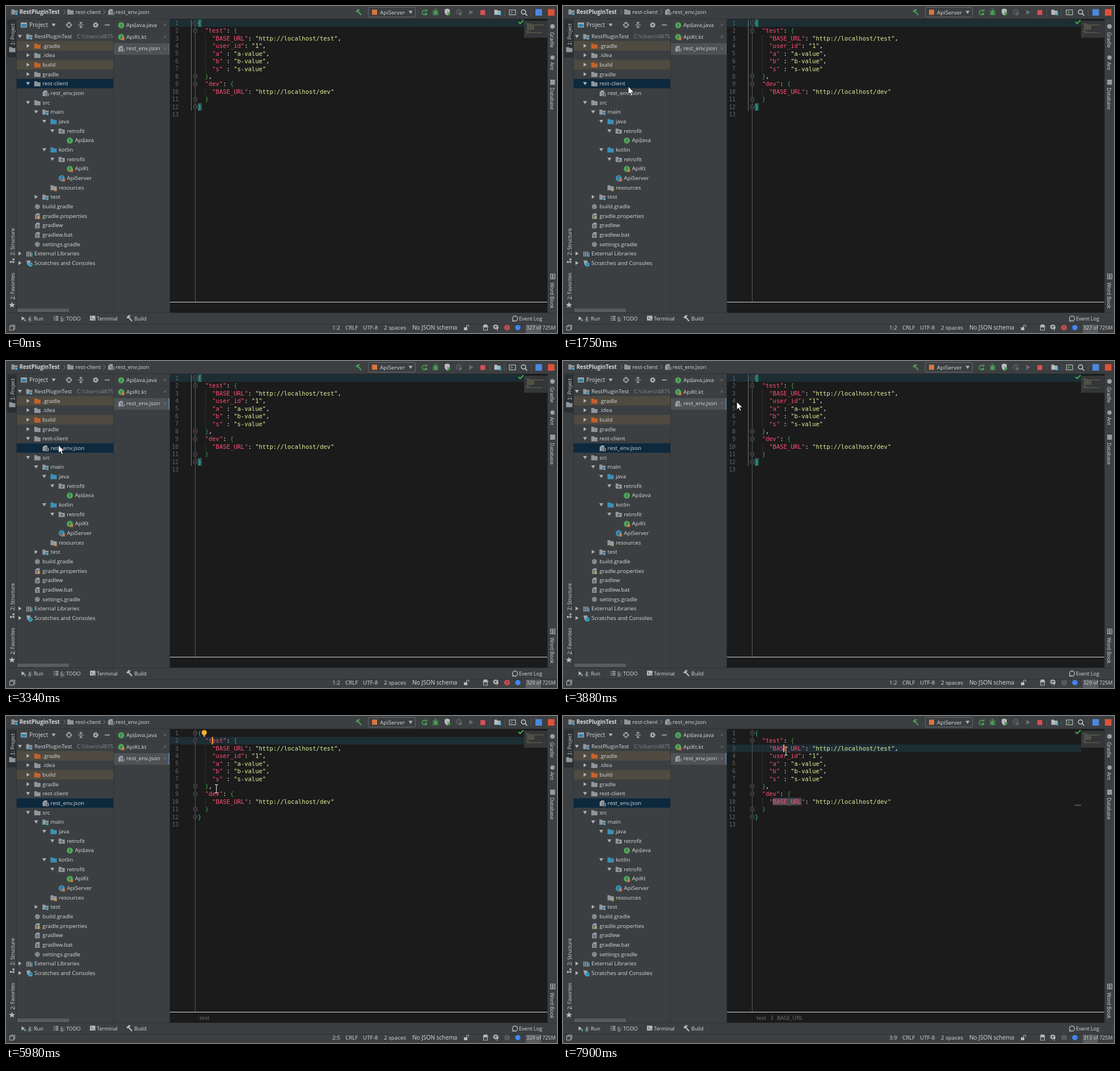
Animation, 971 px wide and 577 px high, one loop 8000 ms. Source, as an HTML page:

```html
<!DOCTYPE html>
<html lang="en">
<head>
<meta charset="utf-8">
<title>IDE session</title>
<style>
html, body { margin: 0; width: 100%; height: 100%; overflow: hidden; background: #3c3f41; }
svg { display: block; width: 100vw; height: 100vh; }
text { font: 9.8px "Open Sans", "Noto Sans", sans-serif; fill: #d6d9db; white-space: pre; }
.code { font: 10.5px "DejaVu Sans Mono", monospace; }
.num { font: 9.6px "DejaVu Sans Mono", monospace; fill: #64676a; }
</style>
</head>
<body>
<svg id="stage" viewBox="0 0 971 577" preserveAspectRatio="none"></svg>
<script>
const LOOP = 8000, CHAR = 6.322, LINE = 13.45, ROW = 16.667, CODE_X = 338;
const GREY = '#b8babc', DIM = '#6a6d70', GREEN = '#499c54', BLUE = '#3d8fb8', ORANGE = '#d9773f';
const lineY = n => 30 + (n - 1) * LINE;
const rowY = n => 53.5 + n * ROW;

// Markup helpers; text is placed by its vertical middle.
const esc = s => s.replace(/&/g, '&amp;').replace(/</g, '&lt;');
const rect = (x, y, w, h, fill, more = '') => `<rect x="${x}" y="${y}" width="${w}" height="${h}" fill="${fill}" ${more}/>`;
const dot = (x, y, r, fill, more = '') => `<circle cx="${x}" cy="${y}" r="${r}" fill="${fill}" ${more}/>`;
const ring = (x, y, r, color = GREY, w = 1.3) => dot(x, y, r, 'none', `stroke="${color}" stroke-width="${w}"`);
const path = (d, fill) => `<path d="${d}" fill="${fill}"/>`;
const line = (d, color = GREY, w = 1.2, more = '') => `<path d="${d}" fill="none" stroke="${color}" stroke-width="${w}" ${more}/>`;
const text = (x, y, s, more = '') => `<text x="${x}" y="${y + 3.5}" ${more}>${esc(s)}</text>`;
const small = (x, y, s) => text(x, y, s, 'style="font-size:9.1px"');
const turned = (x, y, a, s) => `<g transform="translate(${x} ${y}) rotate(${a})">${text(0, 0, s, 'style="font-size:8.9px"')}</g>`;
const group = (id, body) => `<g id="${id}">${body}</g>`;

// Icons, each centred on x, y.
const folder = (x, y, c = '#8f979c') => path(`M${x - 5.5} ${y - 4.5}h4.5l1.5 1.8h5v7.2h-11z`, c);
const badge = (x, y) => rect(x + 1, y + 1, 4.5, 4.5, '#40b6e0', 'stroke="#3c3f41" stroke-width=".8"');
const module = (x, y) => folder(x, y) + badge(x, y);
const pack = (x, y) => folder(x, y) + dot(x, y + 1, 1.4, '#3c3f41');
const resources = (x, y) => folder(x, y) + line(`M${x + 1} ${y + 1.5}h5m-5 2h5m-5 2h5`, '#e0a84a', 1);
const sheet = (x, y) => path(`M${x - 1} ${y - 5}h5v10h-8v-7z`, '#9aa2a8');
const page = (x, y) => sheet(x, y) + line(`M${x - 2.5} ${y - 1}h5m-5 2h5m-5 2h5`, '#3c3f41', .9);
const json = (x, y) => {
  const braces = `M${x + 1.5} ${y - .5}q-1.5 0-1.5 1.5 0 1.3-1 1.3 1 0 1 1.3 0 1.5 1.5 1.5m2-5.6q1.5 0 1.5 1.5 0 1.3 1 1.3-1 0-1 1.3 0 1.5-1.5 1.5`;
  return sheet(x - 1, y) + line(braces, '#3c3f41', 2.6) + line(braces, '#c3c9cd', 1);
};
const props = (x, y) => page(x, y) + line(`M${x - 1} ${y + 5}v-3`, '#e05555', 1.6) + line(`M${x + 1.5} ${y + 5}v-5`, '#e0b040', 1.6) + line(`M${x + 4} ${y + 5}v-4`, '#62b543', 1.6);
const letter = (x, y, c, s) => dot(x, y, 5.4, c) + text(x, y - .6, s, 'text-anchor="middle" style="font-size:8px;fill:#243;font-weight:600"');
const face = (x, y) => letter(x, y, '#4fa65a', 'I');
const ktFace = (x, y) => face(x, y) + rect(x + 1, y + 1, 4.6, 4.6, ORANGE);
const ktClass = (x, y) => letter(x, y, '#3f93bd', 'C') + rect(x + 1, y + 1, 4.6, 4.6, ORANGE);
const build = (x, y) => dot(x, y, 4.5, '#7f8b91');
const libs = (x, y) => line(`M${x - 4} ${y - 4}v9m3-9v9m3-9v9`, '#9aa7b0', 1.7) + line(`M${x + 4.5} ${y - 2}v7`, '#40b6e0', 1.7);
const scratch = (x, y) => path(`M${x - 5} ${y - 5}h7v8h-5z`, '#9aa2a8') + dot(x + 2, y + 2, 3.8, '#40a6d0') + line(`M${x + 2} ${y}v2h2`, '#263238', 1);
const arrow = (x, y, open) => path(open ? `M${x - 3.5} ${y - 2.5}h7l-3.5 5.5z` : `M${x - 2.5} ${y - 3.5}v7l5.5-3.5z`, '#b0b3b5');
const gear = (x, y) => ring(x, y, 2.6, GREY, 1.8) + dot(x, y, 4.2, 'none', `stroke="${GREY}" stroke-width="1.6" stroke-dasharray="1.7 1.6"`);
const chevron = (x, y, c = '#7b7e80') => line(`M${x - 1.5} ${y - 4}l3 4-3 4`, c, 1);
const hammer = (x, y, c) => line(`M${x - 2} ${y - 2}l6 7`, c, 2.2) + path(`M${x - 6} ${y - 1}l4-4.5 4 .5-5 5.5z`, c);
const cross = (x, y) => line(`M${x - 2} ${y - 2}l4 4m0-4l-4 4`, '#7b7e80', .9);

// Tree rows: depth, state (1 open, 0 closed, -1 leaf), icon, label.
const excluded = (x, y) => folder(x, y, '#c4622d');
const sources = (x, y) => folder(x, y, BLUE);
const tree = [
  [0, 1, module, 'RestPluginTest'], [1, 0, excluded, '.gradle'], [1, 0, folder, '.idea'],
  [1, 0, excluded, 'build'], [1, 0, folder, 'gradle'], [1, 1, folder, 'rest-client'],
  [2, -1, json, 'rest_env.json'], [1, 1, folder, 'src'], [2, 1, module, 'main'],
  [3, 1, sources, 'java'], [4, 1, pack, 'retrofit'], [5, -1, face, 'ApiJava'],
  [3, 1, sources, 'kotlin'], [4, 1, pack, 'retrofit'], [5, -1, ktFace, 'ApiKt'],
  [4, -1, ktClass, 'ApiServer'], [3, -1, resources, 'resources'], [2, 0, module, 'test'],
  [1, -1, build, 'build.gradle'], [1, -1, props, 'gradle.properties'], [1, -1, page, 'gradlew'],
  [1, -1, page, 'gradlew.bat'], [1, -1, build, 'settings.gradle'],
  [0, 0, libs, 'External Libraries'], [0, 0, scratch, 'Scratches and Consoles']
];
const source = [
  '{', '  "test": {', '    "BASE_URL": "http://localhost/test",', '    "user_id": "1",',
  '    "a" : "a-value",', '    "b" : "b-value",', '    "s" : "s-value"', '  },',
  '  "dev": {', '    "BASE_URL": "http://localhost/dev"', '  }', '}', ''
];

function treePanel() {
  let s = rect(19, 23, 171, 518, '#3c3f41') + [1, 3].map(n => rect(19, rowY(n) - 8.3, 170, ROW, '#4f4b41')).join('');
  s += rect(19, 0, 170, ROW, '#0d293e', 'id="sel"');
  tree.forEach(([d, state, icon, label], n) => {
    const x = 41 + d * 14.3, y = rowY(n);
    if (state >= 0) s += arrow(x - 16.5, y, state);
    s += icon(x, y + .5) + text(x + 9, y, label);
  });
  s += text(125, rowY(0), 'C:\\Users\\4875', 'style="fill:#85898c"');
  s += rect(26, 29, 11, 9, '#9aa7b0') + rect(27.3, 32, 8.4, 4.8, '#2f83a8');
  s += text(41, 33.5, 'Project', 'style="font-size:10.2px"') + arrow(84, 33.5, 1);
  s += ring(111, 33.5, 4) + line('M111 28v4m0 3v4M105.5 33.5h4m3 0h4');
  s += line('M127 33.5h10M132 27.5v3.5m0 5v3.5M129.5 29l2.5 2.3 2.5-2.3M129.5 38l2.5-2.3 2.5 2.3', GREY, 1.1);
  return s + gear(158, 33.5) + line('M174 33.5h9', GREY, 1.4) + rect(20, 534, 91, 6, '#595b5d');
}

function tabs() {
  const items = [[face, 'ApiJava.java'], [ktFace, 'ApiKt.kt'], [json, 'rest_env.json']];
  return rect(190, 23, 99, 518, '#3c3f41') + rect(190, 65, 99, 21, '#4e5254') + rect(286.5, 65, 2.5, 21, '#747a80', 'id="mark"') +
    items.map(([icon, s], i) => icon(203, 34 + i * 20.7) + text(212, 33.5 + i * 20.7, s) + cross(280, 33.5 + i * 20.7)).join('') +
    line('M190 44.5h98M190 64.8h98', '#35383a', .8);
}

function codeLine(s, n) {
  const indent = s.search(/\S/);
  if (indent < 0) return '';
  const brace = indent ? '#3fa04a' : '#22c3a6';
  const body = s.trim().replace(/"[^"]*"(?=\s*:)|"[^"]*"|[{}]/g, m => {
    const key = m[0] === '"' && /^\s*:/.test(s.slice(s.indexOf(m) + m.length));
    const c = m[0] !== '"' ? brace : key ? '#ff4d76' : '#dcf49a';
    return `<tspan fill="${c}">${m}</tspan>`;
  });
  return `<text class="code" style="fill:#f2f2f2" x="${CODE_X + indent * CHAR}" y="${lineY(n + 1) + 3.8}">${body}</text>`;
}

function editor() {
  let s = rect(289, 23, 666, 518, '#1b1b1b') + rect(289, 0, 624, LINE, '#1d2d34', 'id="current"');
  s += line('M333.5 24V522', '#55585a', 1) + line('M351.5 51V118M351.5 145v13', '#3a3a3a', 1, 'stroke-dasharray="2 1"');
  s += group('braces', rect(338, 23.5, 6.8, 13.3, '#2d5f59') + rect(338, 171.5, 6.8, 13.3, '#2d5f59') + line('M326.5 24V185', '#6f7577', 1));
  s += rect(CODE_X + 5 * CHAR, lineY(10) - 6.5, 8 * CHAR, 13, '#484a50', 'id="usage"');
  source.forEach((l, i) => {
    s += `<text class="num" text-anchor="end" x="304" y="${lineY(i + 1) + 3.6}">${i + 1}</text>` + codeLine(l, i);
  });
  for (const n of [1, 2, 8, 9, 11, 12]) {
    const y = lineY(n);
    s += rect(330.5, y - 3.2, 6, 6.4, '#1b1b1b', 'stroke="#606366" stroke-width=".9" rx="1"') + line(`M331.8 ${y}h3.4`, '#777', .9);
  }
  // Minimap and inspection mark.
  s += rect(913, 26, 41, 30, '#343637');
  source.forEach((l, i) => {
    const d = Math.max(0, l.search(/\S/));
    if (l) s += line(`M${915 + d * .8} ${29.5 + i * 1.95}H${915 + l.length * .8}`, '#a5a477', 1, 'opacity=".55" stroke-dasharray="4 .6"');
  });
  s += line('M903 28l3 3 6-6', '#3fae49', 2) + line('M902 157.5h11', '#587573', 1.4, 'id="stripe"');
  s += line('M289 522.5H954', '#d8d8d8', 1.1);
  s += text(341, 532, '', 'id="crumb" style="fill:#747678"');
  s += group('crumb2', chevron(368.5, 532.5, '#858789') + text(377, 532, 'BASE_URL', 'style="fill:#747678"'));
  s += group('bulb', dot(349.3, 29.3, 4.6, '#f2ad2e') + rect(347, 33, 4.6, 1.6, '#d69a31') + rect(347.5, 35, 3.6, 1.3, '#aaa'));
  return s + rect(0, 0, 2, 13.2, '#ffae2b', 'id="caret"');
}

function topBar() {
  const y = 10.5;
  let s = rect(0, 0, 971, 23, '#3c3f41') + module(15, y) + text(23.7, y, 'RestPluginTest', 'style="font-weight:700;font-size:9.7px"');
  s += chevron(103, y) + folder(113.5, y) + text(122, y, 'rest-client');
  s += group('file', chevron(173, y) + json(185, y) + text(193, y, 'rest_env.json'));
  s += hammer(622, 11, GREEN) + rect(638.5, 2.5, 83, 17, '#3c3f41', 'stroke="#66696b" rx="2"');
  s += rect(645, 6.5, 9, 9, ORANGE) + text(659, 11, 'ApiServer') + arrow(713, 11, 1);
  s += line('M740 8.5a4 4 0 1 0 1 5', GREEN, 1.6) + path('M738 9.5h4.5V5z', GREEN) + rect(738, 12, 4, 4, GREEN);
  s += `<ellipse cx="757" cy="12" rx="3.3" ry="4.3" fill="${GREEN}"/>` + line('M752 8l10 8m0-8l-10 8M751.5 12h11M755 5l2 2 2-2', GREEN, 1.1);
  s += path('M773 6l4.5-1.5L782 6v5q-.5 3.5-4.5 5.5-4-2-4.5-5.5z', GREY) + path('M778 10v7.5l6-3.7z', GREEN);
  s += ring(798, 10.5, 4.4, DIM) + line('M798 8v3h2', DIM) + path('M799 11v6l5-3z', DIM) + path('M816.5 6.5v9l7-4.5z', DIM);
  s += rect(836, 7.3, 8.5, 8.5, '#db4f55') + line('M852.5 5v13M878.5 5v13M925.5 5v13', '#505355', 1);
  s += folder(866, 11, GREY) + rect(867, 11, 2.5, 2.5, '#40b6e0') + rect(870, 14, 2.5, 2.5, '#40b6e0') + rect(870, 11, 2.5, 2.5, '#40b6e0');
  s += rect(887, 7, 11, 8.5, 'none', `stroke="${GREY}" stroke-width="1.2"`) + path('M890 9v5l4-2.5z', GREEN);
  s += ring(912, 10.5, 3.8, '#c3c6c8', 1.5) + line('M914.8 13.3l3.7 3.7', '#c3c6c8', 1.7);
  return s + rect(933, 5.5, 11.5, 11.5, '#4d87e0') + rect(955, 5.5, 11.5, 11.5, '#df5139');
}

function sideBars() {
  let s = rect(0, 23, 19, 538, '#3c3f41') + rect(2, 24, 16, 67, '#2c2f31') + turned(11, 69, -90, '1: Project') + folder(11, 77);
  s += turned(11, 440, -90, '7: Structure') + line('M14.8 440v-5M14.8 518v-5M14.8 69v-4', GREY, .8);
  s += rect(7, 450, 3.2, 3.2, GREY) + rect(11.5, 450, 3.2, 3.2, GREY) + rect(11.5, 445.5, 3.2, 3.2, GREY);
  s += turned(11, 518, -90, '2: Favorites') + path('M10.5 522l1.5 3.7 4 .2-3.1 2.5 1.1 3.9-3.5-2.2-3.5 2.2 1.1-3.9-3.1-2.5 4-.2z', GREY);
  s += rect(954, 23, 17, 538, '#3c3f41') + dot(963, 36, 4, '#9aa2a6') + turned(962, 46, 90, 'Gradle');
  s += dot(963, 91, 3.8, '#9aa2a6') + turned(962, 99, 90, 'Ant');
  s += [131, 134, 137].map(y => rect(959, y - .7, 8.5, 2.2, GREY)).join('') + turned(962, 144, 90, 'Database');
  s += rect(959.5, 473, 8, 8.5, 'none', `stroke="${GREY}"`) + line('M961 475.5h5m-5 2h5m-5 2h5M963 473v8', GREY, .8) + turned(962, 488, 90, 'Word Book');
  return s;
}

function bottomBars() {
  let s = rect(0, 541, 971, 36, '#3c3f41');
  s += path('M27.5 547.5v7.5l6-3.8z', GREY) + dot(33.5, 554.5, 1.8, '#50b85a') + small(39, 551, '4: Run') + line('M39 556h5M96 556h5', GREY, .8);
  s += line('M84 548h1.5m1.5 0h5.5M84 551h1.5m1.5 0h5.5M84 554h1.5m1.5 0h5.5', GREY, 1.3) + small(96, 551, '6: TODO');
  s += rect(148, 546.5, 9.5, 8.5, GREY) + line('M150 549l2 1.8-2 1.8m3.5.4h2.5', '#34373a', 1) + small(160, 551, 'Terminal');
  s += hammer(218, 551, GREY) + small(226, 551, 'Build');
  s += ring(897, 551.5, 4.5) + path('M892 557l1-4 3 3z', GREY) + small(904, 551, 'Event Log');
  s += rect(6.5, 565, 7, 7, 'none', `stroke="${GREY}"`) + line('M8.5 565v-2h7v7h-2', GREY, 1);
  s += text(575, 567, '', 'id="pos"') + text(598, 567, 'CRLF') + text(629, 567, 'UTF-8') + text(666, 567, '2 spaces');
  s += text(716, 567, 'No JSON schema', 'style="font-size:10.1px"');
  s += rect(807, 567, 6, 5, GREY) + line('M811.5 567v-2a2 2 0 0 1 4 0v1.5', GREY, 1.1);
  s += path('M842 562h6l.8 3H850v1.2h-10V565h1.2z', GREY) + rect(841.5, 567, 7, 5, 'none', `stroke="${GREY}"`);
  s += gear(863, 566) + text(864, 569, '?', 'style="font-weight:700;font-size:8px"');
  s += dot(883, 567.5, 5, '#d04b4b', 'id="alert"') + line('M883 564.5v3.6m0 1.1v1.4', '#3c3f41', 1.4);
  s += dot(902, 567.5, 4.7, '#4285f4') + rect(916, 561, 27, 16, '#595c5e');
  return s + text(917, 567.5, '', 'id="mem" style="font-size:8.9px"');
}

const stage = document.getElementById('stage');
const frame = line('M0 22.5H971M18.5 23V541M189.5 23V541M288.5 23V541M954.5 23V541M0 541.5H971M0 561.5H971', '#303234', 1);
const pointer = group('arrow', `<path d="M0 0V14L3.2 11 5.6 16.2 7.8 15.2 5.5 10.2H10Z" fill="#fff" stroke="#111" stroke-width=".8"/>`) +
  group('beam', line('M-3.3-7.2h2.3l1 1 1-1h2.3M-3.3 7.2h2.3l1-1 1 1h2.3M0-6.5v13', '#111', 2.4) +
    line('M-3-7.2h2l1 1 1-1h2M-3 7.2h2l1-1 1 1h2M0-6.5v13', '#eee', 1.1));
stage.innerHTML = treePanel() + tabs() + editor() + topBar() + sideBars() + bottomBars() + frame + pointer;

const el = Object.fromEntries([...stage.querySelectorAll('[id]')].map(e => [e.id, e]));
const set = (e, attrs) => { for (const k in attrs) e.setAttribute(k, attrs[k]); };
const show = (e, on) => e.setAttribute('visibility', on ? 'visible' : 'hidden');

// Pointer stops: time, x, y.
const stops = [
  [160, 959, 46], [640, 959, 46], [1420, 208, 122], [1750, 115, 142], [2050, 108, 138], [2260, 108, 138],
  [2590, 82, 152], [3280, 82, 152], [3610, 200, 112], [3790, 200, 112], [3880, 306, 72], [4400, 364, 46],
  [4570, 364, 46], [4660, 364, 44], [5050, 364, 44], [5740, 371, 128], [5920, 371, 128], [6400, 367, 138],
  [6790, 367, 138], [7200, 394, 66], [7720, 394, 66], [7900, 393, 62], [8000, 393, 62]
];
const slope = (i, k) => stops[i + 1] ? (stops[i + 1][k] - stops[i][k]) / (stops[i + 1][0] - stops[i][0]) : 0;
function tangent(i, k) {
  const a = i ? slope(i - 1, k) : 0, b = slope(i, k);
  return a * b > 0 ? 2 * a * b / (a + b) : 0;
}
function pointerAt(t) {
  let i = 0;
  while (i < stops.length - 2 && stops[i + 1][0] <= t) i++;
  const h = stops[i + 1][0] - stops[i][0], u = Math.max(0, (t - stops[i][0]) / h), v = 1 - u;
  return [1, 2].map(k => stops[i][k] * (1 + 2 * u) * v * v + tangent(i, k) * h * u * v * v +
    stops[i + 1][k] * u * u * (3 - 2 * u) - tangent(i + 1, k) * h * u * u * v);
}

const blinks = [130, 690, 1250, 1700, 2200, 2860, 3400, 3960, 4600, 5050, 5640, 6180, 6800];
const carets = [[0, 1, 2], [4300, 2, 5], [6450, 9, 5], [7150, 3, 9]];
const CLICK = 4300, FOCUS = 3310;

function draw(t) {
  const [x, y] = pointerAt(t), inText = x > 334 && x < 954;
  show(el.arrow, t >= stops[0][0] && !inText);
  show(el.beam, t >= stops[0][0] && inText);
  set(inText ? el.beam : el.arrow, { transform: `translate(${x} ${y})` });

  const [, row, col] = carets.filter(c => c[0] <= t).pop();
  set(el.current, { y: lineY(row) - 6.6 });
  set(el.caret, { x: CODE_X + (col - 1) * CHAR - .5, y: lineY(row) - 6.5 });
  show(el.caret, t >= CLICK);
  show(el.braces, t < CLICK);
  show(el.bulb, t >= 5050 && t < 6450);
  el.pos.textContent = row + ':' + col;

  set(el.sel, { y: rowY(t < 2590 ? 5 : 6) - 8.3, fill: t >= 2200 && t < 3115 ? '#4b6eaf' : '#0d293e' });
  show(el.file, t < 2300 || t >= FOCUS);
  set(el.mark, { fill: t < FOCUS ? '#5c6165' : '#4a88c7' });

  const nested = t >= 7390;
  el.crumb.textContent = t < 4400 ? '' : t >= 6800 && !nested ? 'dev' : 'test';
  for (const e of [el.crumb2, el.usage, el.stripe]) show(e, nested);

  set(el.alert, { fill: blinks.filter(b => b <= t).length % 2 ? '#5a5d5f' : '#d04b4b' });
  el.mem.textContent = (t < 2200 ? 327 : t < 6180 ? 329 : 313) + ' of 725M';
}

function tick() {
  draw(performance.now() % LOOP);
  requestAnimationFrame(tick);
}
tick();
</script>
</body>
</html>
```
